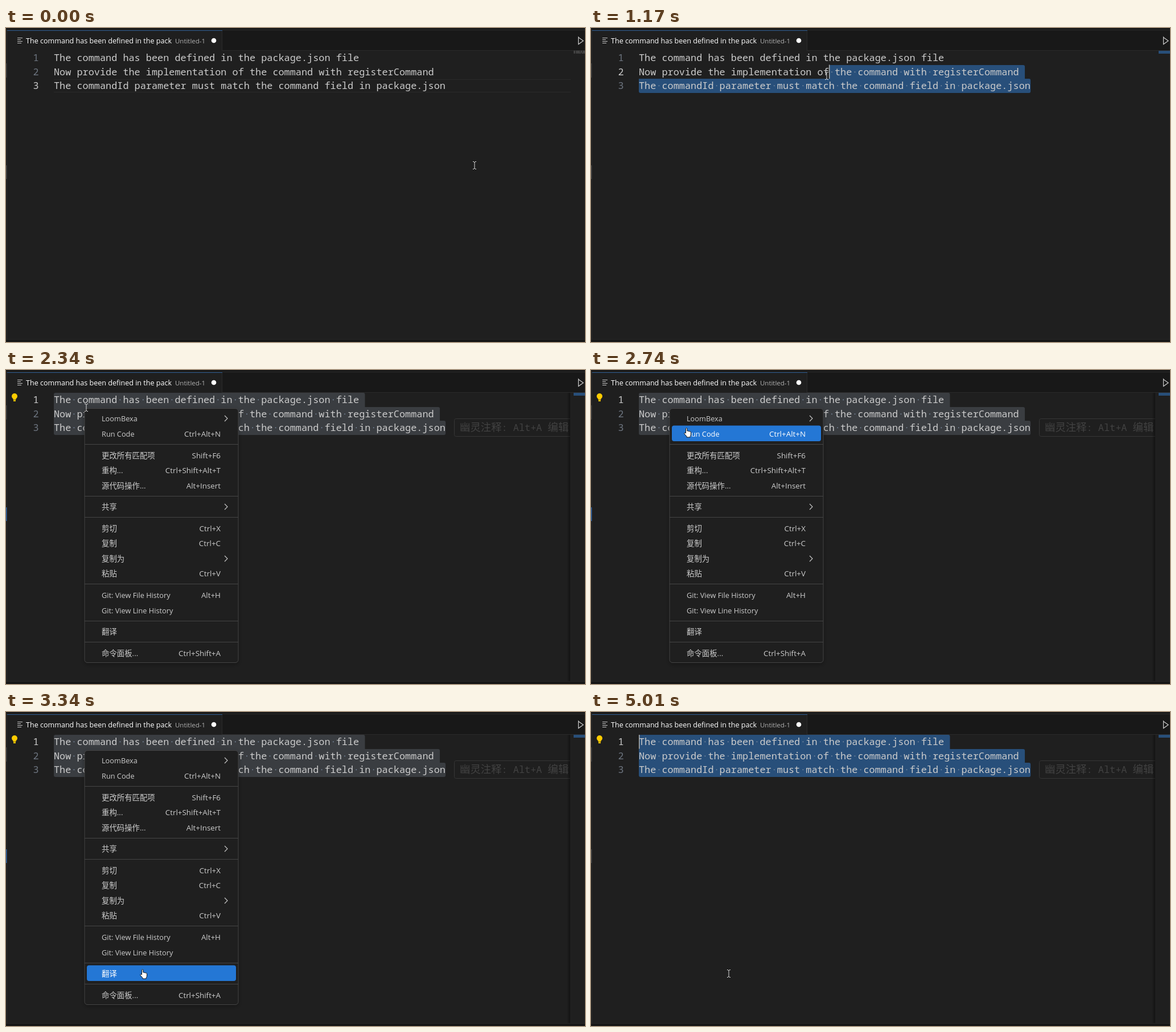
Write an HTML page with a canvas that moves like this. It is 1017 px wide and 551 px high and loops after 5.04 s.

```html
<!DOCTYPE html>
<html lang="zh">
<head>
<meta charset="utf-8">
<title>Editor context menu</title>
<style>
  html, body { margin: 0; height: 100%; overflow: hidden; background: #1f1f1f; }
  canvas { display: block; }
</style>
</head>
<body>
<canvas id="stage" width="1017" height="551"></canvas>
<script>
const ctx = document.getElementById('stage').getContext('2d');
const LOOP = 5040;
const PRESS = 930, BULB_ON = 1380, SHADOW_ON = 1900, MENU_OPEN = 2170, MENU_CLOSE = 3530;
const LEFT = 84, TOP = 40, ROW = 24.5, CELL = 10.12;
const MONO = '16.87px "Noto Sans Mono", monospace';
const ui = size => `${size}px "Open Sans", "Noto Sans CJK SC", "Noto Sans CJK", sans-serif`;

const lines = [
  'The command has been defined in the package.json file',
  'Now provide the implementation of the command with registerCommand',
  'The commandId parameter must match the command field in package.json'
];

// Row centre, label, shortcut ('>' opens a submenu)
const menuItems = [
  [85, 'LoomBexa', '>'], [112, 'Run Code', 'Ctrl+Alt+N'],
  [150, '更改所有匹配项', 'Shift+F6'], [176, '重构...', 'Ctrl+Shift+Alt+T'],
  [203, '源代码操作...', 'Alt+Insert'], [240, '共享', '>'],
  [278, '剪切', 'Ctrl+X'], [304, '复制', 'Ctrl+C'], [331, '复制为', '>'], [357, '粘贴', 'Ctrl+V'],
  [395, 'Git: View File History', 'Alt+H'], [422, 'Git: View Line History', ''],
  [459, '翻译', ''], [497, '命令面板...', 'Ctrl+Shift+A']
];
const separators = [130, 221, 258, 375, 440, 477];

// Pointer path: time, x, y
const path = [
  [0, 823, 241], [60, 823, 241], [520, 808, 121], [830, 804, 115], [PRESS, 790, 110],
  [1150, 420, 85], [1420, 75, 34], [1680, 75, 34], [2050, 141, 66], [2560, 141, 66],
  [2700, 165, 85], [2940, 217, 400], [3180, 241, 459], [LOOP, 242, 459]
];

function pointerAt(t) {
  const i = path.findIndex(p => p[0] > t);
  const [t0, x0, y0] = path[i - 1], [t1, x1, y1] = path[i];
  const k = (t - t0) / (t1 - t0), e = k * k * (3 - 2 * k);
  return { x: Math.round(x0 + (x1 - x0) * e), y: Math.round(y0 + (y1 - y0) * e) };
}

const clamp = (v, lo, hi) => Math.min(hi, Math.max(lo, v));

function rect(color, x, y, w, h) {
  ctx.fillStyle = color;
  ctx.fillRect(x, y, w, h);
}

function round(x, y, w, h, r) {
  ctx.beginPath();
  ctx.roundRect(x, y, w, h, r);
}

function text(str, x, y, font, color, align = 'left') {
  ctx.font = font;
  ctx.fillStyle = color;
  ctx.textAlign = align;
  ctx.fillText(str, x, y);
}

function stroke(color, width, ...points) {
  ctx.strokeStyle = color;
  ctx.lineWidth = width;
  ctx.beginPath();
  points.forEach(([x, y]) => ctx.lineTo(x, y));
  ctx.stroke();
}

function drawFrame(menuOpen) {
  rect('#1f1f1f', 0, 0, 1017, 551);
  rect('#181818', 0, 0, 1017, 39);
  rect('#2b2b2b', 0, 3, 1017, 1);
  rect('#2b2b2b', 380, 39, 637, 1);
  rect('#1f1f1f', 2, 4, 378, 36);
  rect('#2b2b2b', 379, 4, 1, 36);
  rect('#28568a', 2, 4, 378, 1);
  rect('#181818', 0, 4, 1, 543);
  rect('#2b2b2b', 1, 4, 1, 543);
  rect('#262626', 0, 546, 1017, 1);
  rect('#161616', 0, 547, 1017, 4);
  rect('#3a3a3a', 0, 62, 1.5, 25);
  rect(menuOpen ? '#2b62a5' : '#424242', 0, 241, 1.5, 24);

  [9, 6, 9, 7].forEach((w, i) => rect('#c5c5c5', 20, 17 + i * 3, w, 1));
  text('The command has been defined in the pack', 35, 27, ui(12.57), '#fff');
  text('Untitled-1', 297, 27, ui(11.47), '#b0b0b0');
  ctx.fillStyle = '#fff';
  ctx.beginPath();
  ctx.arc(365, 22, 4.3, 0, 7);
  ctx.fill();
  stroke('#ccc', 1.2, [1005.5, 16.5], [1014, 22.5], [1005.5, 28.5], [1005.5, 16], [1006, 16.5]);
}

function drawSelection(row, col, focused) {
  for (let i = row; i < 3; i++) {
    const from = i === row ? col : 0, to = lines[i].length + (i < 2 ? 1 : 0);
    const first = i === row ? 3 : 0, last = i === 2 ? 3 : 0;
    const y = Math.round(TOP + i * ROW), bottom = Math.round(TOP + (i + 1) * ROW);
    ctx.fillStyle = focused ? '#284f7a' : '#3a3d41';
    round(LEFT + from * CELL, y, (to - from) * CELL, bottom - y, [first, 3, last, last]);
    ctx.fill();
    for (let c = from; c < lines[i].length; c++)
      if (lines[i][c] === ' ') rect('#7d8ea3', LEFT + (c + .5) * CELL - .8, y + 11.5, 1.6, 1.6);
  }
}

function drawGhostNote() {
  const color = '#424242', cjk = '18.4px "Noto Sans CJK SC", "Noto Sans CJK", sans-serif';
  ctx.save();
  ctx.beginPath();
  ctx.rect(780, 80, 211, 40);
  ctx.clip();
  ctx.strokeStyle = '#363636';
  ctx.lineWidth = 1;
  round(787.5, 85.5, 260, 31, 3);
  ctx.stroke();
  text('幽灵注释', 797, 107, cjk, color);
  text(': Alt+A', 870.6, 107, MONO, color);
  text('编辑', 951.5, 107, cjk, color);
  ctx.restore();
}

function drawBulb() {
  ctx.fillStyle = '#fc0';
  ctx.beginPath();
  ctx.arc(15, 46, 5, 0, 7);
  ctx.fill();
  ctx.fillRect(12.5, 49, 5, 3);
  ctx.fillRect(13, 52.5, 4, 2.5);
}

function drawMinimap(selected) {
  if (selected) return rect('#284f7a', 997, 40, 20, 5);
  lines.forEach((line, i) => {
    for (let c = 0; c < 20; c++) if (line[c] !== ' ') rect('#595959', 997 + c, 40 + i * 1.7, .8, 1.3);
  });
}

function drawMinimapShadow() {
  const shade = ctx.createLinearGradient(985, 0, 991, 0);
  shade.addColorStop(0, 'rgba(0,0,0,0)');
  shade.addColorStop(1, 'rgba(0,0,0,.4)');
  rect(shade, 985, 40, 6, 506);
}

function drawMenu(pointer) {
  ctx.save();
  ctx.shadowColor = 'rgba(0,0,0,.36)';
  ctx.shadowBlur = 8;
  ctx.shadowOffsetY = 2;
  ctx.fillStyle = '#1f1f1f';
  round(138, 68, 270, 446, 5);
  ctx.fill();
  ctx.restore();
  ctx.strokeStyle = '#454545';
  ctx.lineWidth = 1;
  round(138, 67.5, 270, 446, 5);
  ctx.stroke();
  separators.forEach(y => rect('#454545', 138, y, 270, 1));

  for (const [y, label, key] of menuItems) {
    const hover = Math.abs(pointer.y - y) < 13.5 && pointer.x > 142;
    const color = hover ? '#fff' : '#ccc';
    if (hover) {
      ctx.fillStyle = '#2477d5';
      round(142, y - 14.5, 262, 27.5, 4);
      ctx.fill();
    }
    text(label, 168, y + 4.7, ui(label.charCodeAt(0) < 128 ? 12.75 : 13.4), color);
    if (key === '>') stroke(color, 1.1, [384, y - 5], [389, y], [384, y + 5]);
    else text(key, 377, y + 4.7, ui(13.4), color, 'right');
  }
}

function drawIBeam({ x, y }) {
  const beam = [[-3, -7, 2, 1], [1, -7, 2, 1], [-1, -6, 2, 1], [-.5, -6, 1, 12],
                [-1, 5, 2, 1], [-3, 6, 2, 1], [1, 6, 2, 1]];
  beam.forEach(([dx, dy, w, h]) => rect('#d8d8d8', x + dx, y + dy, w, h));
}

function drawHand({ x, y }) {
  ctx.save();
  ctx.translate(x - 6, y - 8);
  const hand = new Path2D('M3.5 10V1.6q1.2-1.6 2.4 0V6q1.3-.8 2.2.5 1.4-.7 2.1.5 2-.6 2.3 1.3V12q0 2-1.4 3.6V17H5v-1.5L.8 10.8q0-2 1.7-1.6z');
  ctx.fillStyle = '#fff';
  ctx.strokeStyle = '#111';
  ctx.lineWidth = 1;
  ctx.fill(hand);
  ctx.stroke(hand);
  ctx.restore();
}

function caretVisible(t, menuOpen) {
  if (menuOpen) return false;
  if (t < PRESS) return t >= 200 && t < 700;
  const since = t < MENU_OPEN ? Math.max(0, t - 1420) : t - MENU_CLOSE;
  return since % 1000 < 500;
}

function draw(t) {
  const menuOpen = t >= MENU_OPEN && t < MENU_CLOSE;
  const pointer = pointerAt(t);
  const drag = pointerAt(Math.min(t, 1500));
  let row = 2, col = lines[2].length;
  if (t >= PRESS) {
    row = clamp(Math.floor((drag.y - TOP) / ROW), 0, 2);
    col = clamp(Math.round((drag.x - LEFT) / CELL), 0, lines[row].length);
  }
  const selected = row < 2 || col < lines[2].length;

  drawFrame(menuOpen);
  if (selected) drawSelection(row, col, !menuOpen);
  else [90, 112].forEach(y => rect('#2a2a2a', LEFT, y, 908, 1));
  lines.forEach((line, i) => {
    const y = TOP + 18 + i * ROW;
    text(i + 1, 47.5, y, MONO, i === row ? '#ccc' : '#6e7681');
    text(line, LEFT, y, MONO, '#ccc');
  });
  if (t >= BULB_ON) {
    drawGhostNote();
    drawBulb();
  }
  if (caretVisible(t, menuOpen)) rect('#aeafad', LEFT + col * CELL, TOP + row * ROW, 1.5, 24.5);
  drawMinimap(selected);
  if (t >= SHADOW_ON) drawMinimapShadow();
  if (menuOpen) drawMenu(pointer);
  (menuOpen && pointer.y > 72 ? drawHand : drawIBeam)(pointer);
}

function tick() {
  draw(performance.now() % LOOP);
  requestAnimationFrame(tick);
}
tick();
</script>
</body>
</html>
```
